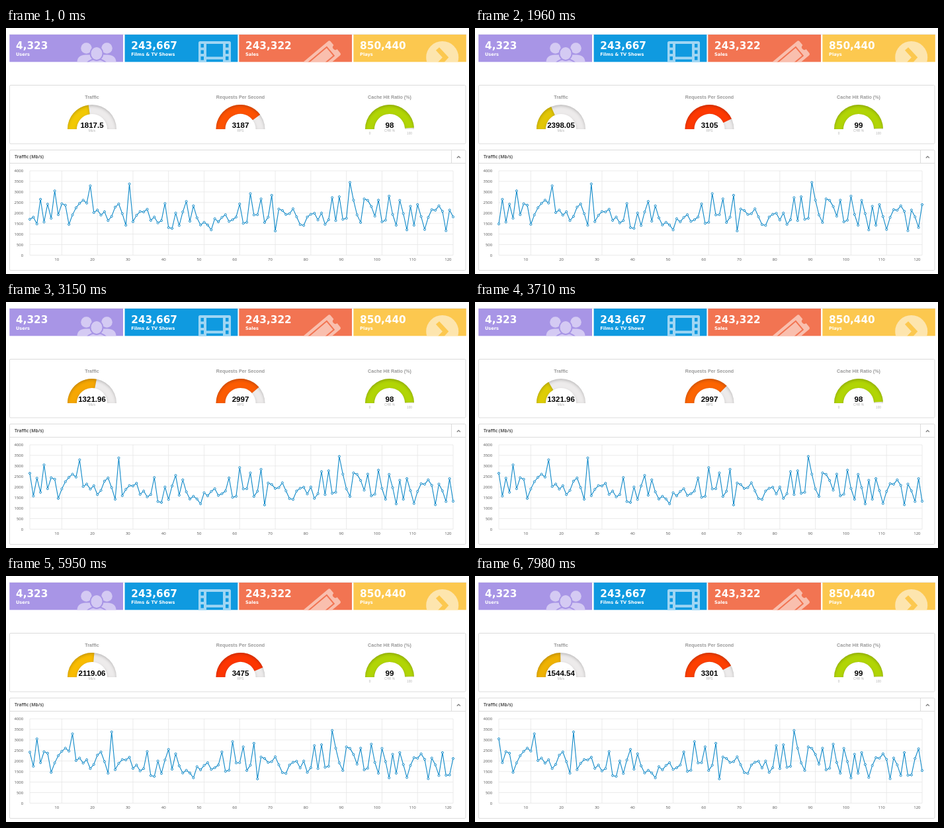
These frames come from a looping animation (700x372 px, 8 s). An HTML page:

```html
<!DOCTYPE html>
<html lang="en">
<head>
<meta charset="utf-8">
<title>Streaming dashboard</title>
<style>
  html, body { margin: 0; width: 100%; height: 100%; overflow: hidden; background: #fff; }
  svg { display: block; width: 100vw; height: 100vh; }
  .card { font-family: "DejaVu Sans", Verdana, sans-serif; font-weight: 700; fill: #fff; }
  .gauge { font-family: "Liberation Sans", Arial, sans-serif; text-anchor: middle; }
  .panel { fill: #fff; stroke: #dcdcdc; }
  .axis { font: 6px "Open Sans", sans-serif; fill: #545454; }
  .grid { fill: none; stroke: #e6e6e6; stroke-width: .8; }
</style>
</head>
<body>
<svg id="stage" viewBox="0 0 700 372">
  <defs>
    <filter id="inset" filterUnits="userSpaceOnUse" x="0" y="90" width="700" height="90" color-interpolation-filters="sRGB">
      <feOffset dy="2"/>
      <feGaussianBlur stdDeviation="2.2" result="soft"/>
      <feComposite in="SourceGraphic" in2="soft" operator="out" result="edge"/>
      <feFlood flood-color="#000" flood-opacity=".2"/>
      <feComposite in2="edge" operator="in"/>
      <feComposite in2="SourceGraphic" operator="over"/>
    </filter>
    <clipPath id="cardArea"><rect y="10" width="700" height="41.3"/></clipPath>
  </defs>

  <path d="M5 9.6H696" stroke="#e6e4ec" stroke-width=".8"/>
  <g id="cards" class="card"></g>
  <g clip-path="url(#cardArea)">
    <g fill="#d4caf3">
      <circle cx="121.5" cy="30.5" r="8.3"/>
      <circle cx="152.5" cy="30.5" r="8.3"/>
      <path d="M107.5 52C107.5 44 113 40.5 121 40.5H153C161 40.5 166.5 44 166.5 52Z"/>
      <g stroke="#a895e6" stroke-width="2">
        <ellipse cx="137" cy="58" rx="16.5" ry="11"/>
        <ellipse cx="137" cy="38.5" rx="9.5" ry="10.5"/>
      </g>
    </g>
    <path fill="#a0d6f3" fill-rule="evenodd" d="M293.5 20H337.5Q340 20 340 22.500V60H291V22.500Q291 20 293.500 20Z
      M303 24V43.500H328V24Z M303 47.500V60H328V47.500Z
      M294.500 24V29.500H299V24Z M294.500 33.500V39H299V33.500Z M294.500 43V48.500H299V43Z
      M332 24V29.500H336.500V24Z M332 33.500V39H336.500V33.500Z M332 43V48.500H336.500V43Z"/>
    <g transform="translate(498 29) rotate(-40)">
      <path fill="#f9bfae" d="M-62-14H-3Q0-14 0-11V-4A4 4 0 0 0 0 4V11Q0 14-3 14H-62Z"/>
      <rect x="-46" y="-8.5" width="36" height="17" fill="none" stroke="#f27452" stroke-width="2"/>
    </g>
    <circle cx="659.7" cy="44.500" r="24.500" fill="#fde5ae"/>
    <path d="M652.500 31.500L664.500 44.500L652.500 57.500" fill="none" stroke="#fcc84f" stroke-width="7"/>
  </g>

  <rect class="panel" x="5.5" y="86.5" width="689.5" height="88.500" rx="1.500"/>
  <g id="gauges" class="gauge"></g>

  <rect class="panel" x="5.5" y="184.5" width="689.5" height="182" rx="1.500"/>
  <path d="M6 204.500H695M673.500 185V204" stroke="#dcdcdc"/>
  <path d="M681.800 196.500L684.300 194L686.800 196.500" fill="none" stroke="#777" stroke-width="1.200"/>
  <text x="13" y="197.200" font-family="Open Sans, sans-serif" font-size="6.7" font-weight="700" fill="#555">Traffic (Mb/s)</text>
  <g id="axes" class="axis"></g>
  <path id="line" fill="none" stroke="#0d88c8" stroke-width="1.100" stroke-linejoin="round"/>
  <path id="dots" fill="#fff" stroke="#0d88c8" stroke-width="1"/>
</svg>

<script>
const LOOP = 8000, TICK = 70, REFRESH = 525, VISIBLE = 120;
const CHART = { left: 36, right: 676, top: 216, bottom: 343.5, max: 4000 };

const traffic = [
  1700, 1805, 1480, 2650, 1570, 2420, 1750, 3050, 1920, 2440, 2370, 1460, 1910, 2250, 2460, 2610, 2470, 3290, 2020, 2140,
  1900, 2060, 1640, 1840, 2280, 2430, 1970, 1420, 3380, 1590, 1890, 2070, 2050, 2180, 1650, 1810, 1530, 1640, 2450, 1310,
  1270, 2000, 1410, 2050, 2550, 1610, 2340, 1770, 1430, 1560, 1430, 1200, 1730, 1580, 1790, 1920, 1600, 1680, 1810, 2430,
  1510, 1560, 2920, 1910, 1920, 2670, 1550, 1800, 2840, 1150, 2190, 2120, 1930, 1970, 2200, 1820, 1450, 1410, 1810, 1940,
  1990, 1670, 2000, 1460, 1680, 2730, 1640, 2770, 1700, 1750, 3450, 2610, 1910, 1550, 2670, 2600, 2310, 1850, 2610, 1580,
  1660, 2800, 1930, 1420, 2600, 1970, 1200, 2320, 1420, 2400, 1830, 1220, 1790, 2160, 2130, 2340, 2080, 1160, 2140, 1817.5,
  1311.89, 2398.05, 1321.96, 1337.87, 2119.06, 2580.33, 1544.54
];
const updates = [480, 1950, 3140, 4260, 5425, 6615, 7805];

const heat = ["#a9d70b", "#f9c802", "#ff0000"];
const gauges = [
  { title: "Traffic", unit: "Mb/s", x: 130, max: 4000, colors: heat, values: traffic.slice(VISIBLE - 1) },
  { title: "Requests Per Second", unit: "RPS", x: 354.5, max: 4000, colors: heat,
    values: [3187, 3500, 3105, 2997, 3147, 3475, 3480, 3301] },
  { title: "Cache Hit Ratio (%)", unit: "CHR %", x: 580, max: 100, colors: ["#b1d505", "#b1d505", "#b1d505"],
    values: [98, 99, 99, 98, 99, 99, 99, 99], range: true }
];
const cards = [
  [5.3, 171.7, "#a895e6", "4,323", "Users"],
  [179.6, 170.8, "#0f9ae0", "243,667", "Films & TV Shows"],
  [352.3, 170.7, "#f27452", "243,322", "Sales"],
  [525.4, 170.4, "#fcc84f", "850,440", "Plays"]
];

const byId = id => document.getElementById(id);
function add(parent, tag, attrs, text = "") {
  const node = document.createElementNS(parent.namespaceURI, tag);
  for (const name in attrs) node.setAttribute(name, attrs[name]);
  node.textContent = text;
  return parent.appendChild(node);
}
const mix = (a, b, p) => a + (b - a) * p;
const chartX = i => mix(CHART.left, CHART.right, i / (VISIBLE - 1));
const chartY = v => mix(CHART.bottom, CHART.top, v / CHART.max);

// Half-ring from the left end up to the given share of the half turn.
function ring(cx, share, cy = 153, outer = 37, inner = 23.1) {
  const a = Math.PI * (1 - share), c = Math.cos(a), s = Math.sin(a);
  return `M${cx - inner} ${cy}H${cx - outer}A${outer} ${outer} 0 0 1 ${cx + outer * c} ${cy - outer * s}` +
    `L${cx + inner * c} ${cy - inner * s}A${inner} ${inner} 0 0 0 ${cx - inner} ${cy}Z`;
}

const channels = hex => [1, 3, 5].map(i => parseInt(hex.slice(i, i + 2), 16));
const blend = (a, b, p) => a.map((v, i) => mix(v, b[i], p));
function levelColor(colors, share) {
  const [low, mid, high] = colors.map(channels);
  return share < .5 ? blend(low, mid, share * 2) : blend(mid, high, share * 2 - 1);
}

for (const [x, width, fill, count, label] of cards) {
  const group = byId("cards");
  add(group, "rect", { x, y: 10, width, height: 41.3, fill });
  const textX = x + 9.7;
  add(group, "text", { x: textX, y: 32, "font-size": 15.3 }, count);
  add(group, "text", { x: textX, y: 42, "font-size": 6.6 }, label);
}

for (const g of gauges) {
  const group = byId("gauges");
  const label = (x, y, size, fill, text, weight = 400) =>
    add(group, "text", { x, y, fill, "font-size": size, "font-weight": weight }, text);
  label(g.x, 107.4, 7.15, "#999", g.title, 700);
  add(group, "path", { d: ring(g.x, 1), fill: "#edebeb", filter: "url(#inset)" });
  g.level = add(group, "path", { filter: "url(#inset)" });
  g.text = label(g.x, 150.6, 11.5, "#010101", "", 700);
  label(g.x, 157, 4.8, "#b3b3b3", g.unit);
  if (g.range) {
    label(g.x - 30, 161, 4.8, "#b3b3b3", "0");
    label(g.x + 30, 161, 4.8, "#b3b3b3", g.max);
  }
}

let grid = `M${CHART.left} ${CHART.top}V${CHART.bottom}`;
for (let v = 0; v <= CHART.max; v += 500) {
  grid += `M${CHART.left} ${chartY(v)}H${CHART.right}`;
  add(byId("axes"), "text", { x: 26.2, y: chartY(v) + 2.3, "text-anchor": "end" }, v);
}
for (let n = 10; n <= VISIBLE; n += 10) {
  grid += `M${chartX(n - 1)} ${CHART.top}V${CHART.bottom}`;
  add(byId("axes"), "text", { x: chartX(n - 1) - 7.6, y: 352.2, "text-anchor": "middle" }, n);
}
add(byId("axes"), "path", { class: "grid", d: grid });

function drawChart(shift) {
  const points = traffic.slice(shift, shift + VISIBLE).map((v, i) => [chartX(i).toFixed(2), chartY(v).toFixed(2)]);
  byId("line").setAttribute("d", "M" + points.map(p => p.join(" ")).join("L"));
  byId("dots").setAttribute("d", points.map(([x, y]) =>
    `M${x - 1.5} ${y}a1.5 1.5 0 1 0 3 0a1.5 1.5 0 1 0 -3 0`).join(""));
}

function drawGauge(g, step, progress) {
  const to = g.values[step] / g.max;
  const from = g.values[Math.max(0, step - 1)] / g.max;
  const color = blend(levelColor(g.colors, from), levelColor(g.colors, to), progress);
  g.level.setAttribute("d", ring(g.x, mix(from, to, progress)));
  g.level.setAttribute("fill", `rgb(${color.map(Math.round)})`);
  g.text.textContent = g.values[step];
}

let lastTime = -1;
function render() {
  const time = Math.floor(performance.now() % LOOP / TICK) * TICK;
  if (time !== lastTime) {
    lastTime = time;
    const step = updates.filter(start => start <= time).length;
    const elapsed = step ? (time - updates[step - 1]) / REFRESH : 1;
    const progress = Math.min(1, elapsed) ** .48;
    drawChart(step);
    for (const g of gauges) drawGauge(g, step, progress);
  }
  requestAnimationFrame(render);
}
render();
</script>
</body>
</html>
```
